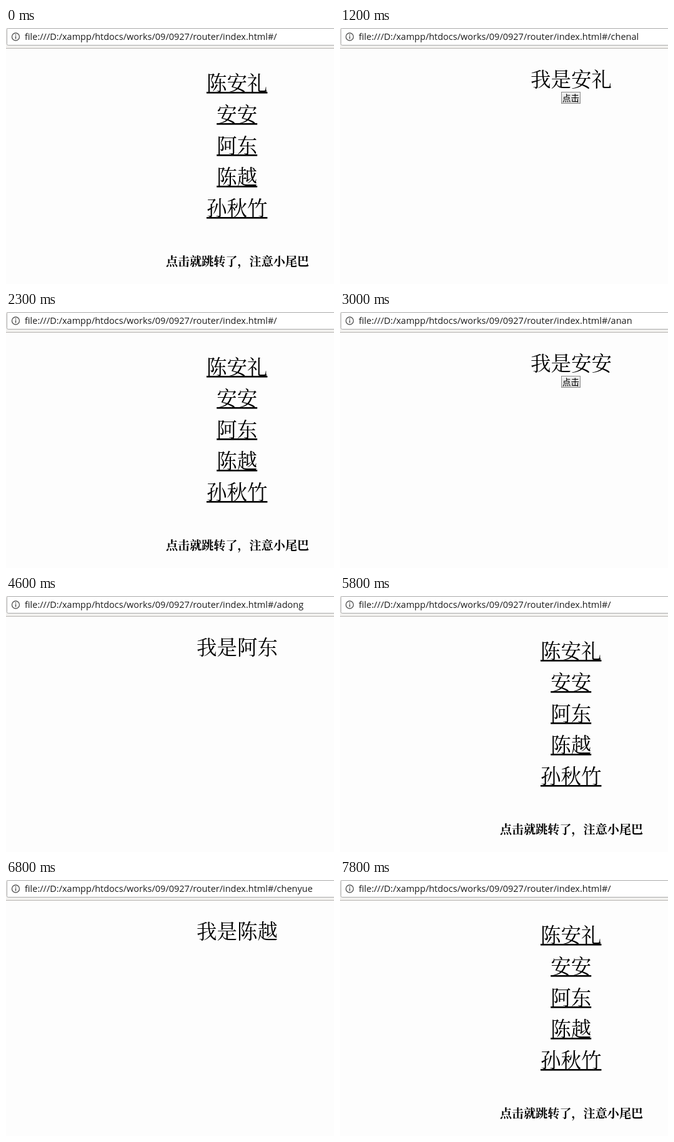
Recreate the animation shown at these times as an HTML page. Size 525 px wide and 409 px high, loop 8000 ms.

```html
<!DOCTYPE html>
<html lang="zh-CN">
<head>
<meta charset="utf-8">
<style>
  html, body { margin: 0; width: 100%; height: 100%; overflow: hidden; background: #fdfdfd; }
  svg { display: block; width: 525px; height: 409px; }
  .cjk { font-family: "Noto Serif CJK SC", "Noto Sans CJK SC", "Noto Sans CJK", serif; text-anchor: middle; }
  .link { font-size: 32.5px; }
  .title { font-size: 32.5px; font-weight: 500; }
  .note { font-size: 19.1px; font-weight: 700; }
  .label { font: 13.5px "Noto Sans CJK SC", "Noto Sans CJK", sans-serif; text-anchor: middle; }
  .url { font: 14.5px "Open Sans", "Noto Sans", sans-serif; fill: #1c1c1c; }
</style>
</head>
<body>
<svg viewBox="0 0 525 409">
  <defs>
    <linearGradient id="face" x2="0" y2="1">
      <stop offset="0" stop-color="#f3f3f3"/>
      <stop offset="1" stop-color="#d6d6d6"/>
    </linearGradient>
  </defs>
  <rect width="525" height="409" fill="#fdfdfd"/>
  <rect width="525" height="32" fill="#f2f1ef"/>
  <path d="M0 32.5H525" stroke="#b6b4b0"/>
  <rect x="1.5" y=".5" width="540" height="27" rx="2" fill="#fff" stroke="#a9a9a9"/>
  <circle cx="15.5" cy="14" r="6" fill="none" stroke="#5a5a5a" stroke-width="1.4"/>
  <path d="M15.5 10.3V11.9M15.5 13V17.5" stroke="#5a5a5a" stroke-width="1.6"/>
  <text id="url" class="url" x="30" y="19"></text>

  <g id="home">
    <g id="links"></g>
    <text class="cjk note" x="370.5" y="380">点击就跳转了，注意小尾巴</text>
  </g>

  <g id="page">
    <text id="title" class="cjk title" x="370" y="94"></text>
    <g id="button">
      <rect x="354.5" y="102.5" width="30" height="18" fill="url(#face)" stroke="#8a8a8a"/>
      <text class="label" x="369.5" y="116.5">点击</text>
    </g>
  </g>
</svg>
<script>
  const LOOP = 8000;
  const BASE = "file:///D:/xampp/htdocs/works/09/0927/router/index.html#/";
  const people = ["陈安礼", "安安", "阿东", "陈越", "孙秋竹"];
  const visits = [
    { from: 1200, to: 2300, path: "chenal", name: "安礼", button: true },
    { from: 3000, to: 3900, path: "anan", name: "安安", button: true },
    { from: 4600, to: 5800, path: "adong", name: "阿东" },
    { from: 6800, to: 7800, path: "chenyue", name: "陈越" }
  ];
  const el = id => document.getElementById(id);
  const show = (id, on) => el(id).setAttribute("display", on ? "inline" : "none");

  el("links").innerHTML = people.map((name, i) => {
    const w = name.length * 32.5, y = 100 + i * 50;
    return `<text class="cjk link" x="369.7" y="${y}">${name}</text>` +
      `<rect x="${369.7 - w / 2}" y="${y + 2}" width="${w}" height="2.6"/>`;
  }).join("");

  let shown = null;

  function draw(t) {
    const visit = visits.find(v => t >= v.from && t < v.to);
    if (visit === shown) return;
    shown = visit;
    el("url").textContent = BASE + (visit ? visit.path : "");
    el("title").textContent = visit ? "我是" + visit.name : "";
    show("home", !visit);
    show("page", visit);
    show("button", visit && visit.button);
  }

  const start = performance.now();
  function tick() {
    draw((performance.now() - start) % LOOP);
    requestAnimationFrame(tick);
  }
  tick();
</script>
</body>
</html>
```
